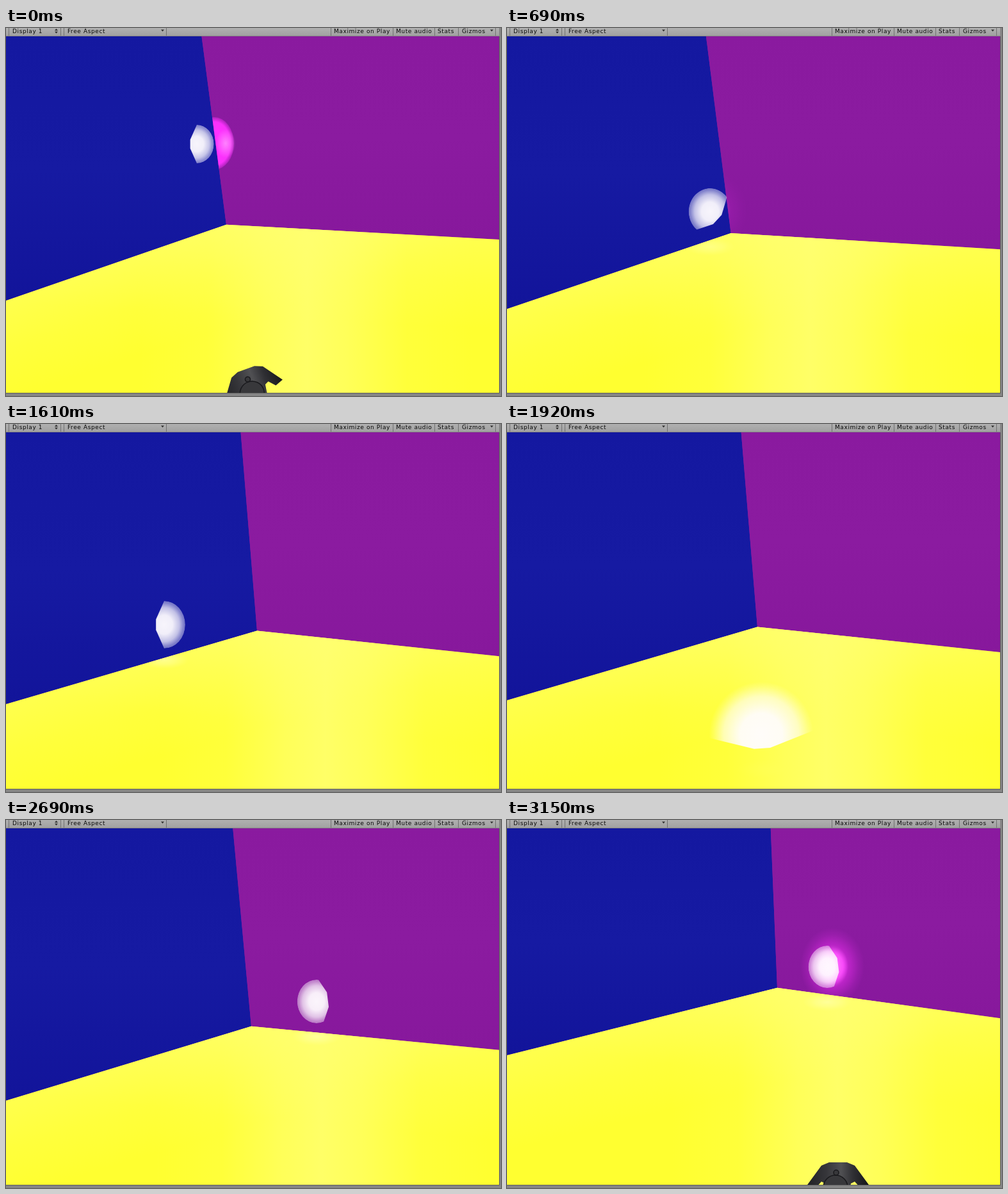
Animation of 773x574 px, one loop 3.23 s. Source, as an HTML page with a canvas:

```html
<!DOCTYPE html>
<html lang="en">
<head>
<meta charset="utf-8">
<style>
html, body { margin: 0; width: 100%; height: 100%; overflow: hidden; background: #868686; }
canvas { display: block; }
</style>
</head>
<body>
<canvas id="stage" width="773" height="574"></canvas>
<script>
const ctx = document.getElementById('stage').getContext('2d');
const LOOP = 3230, FPS = 13, STEPS = 42;
const TOP = 13, RIGHT = 770, BOTTOM = 569, RAD = Math.PI / 180;

// Key rows: step, then the values to blend
const corner = [[0, 344, 306.8], [5, 351, 312.8], [14, 348, 328.8], [21, 392, 322.6],
  [25, 391, 316.6], [35, 383, 321.8], [41, 422, 261.8]];
// x, y, radius, direction of the cut in degrees
const ball = [[0, 298, 181, 30, 180], [5, 250, 376, 39, 88], [14, 401, 174, 33, -8], [21, 247, 313, 37, 180],
  [25, 397, 484, 82, 86], [35, 485, 283, 34, -8], [41, 500, 229, 33, -8]];
// strength, hardness
const glow = [[0, 1, 1], [5, 0, 0], [14, 1, 0], [21, 0, 0], [35, 0, 0], [41, 1, 0]];
// x, y, tilt
const pad = [[0, 374.5, 531, -20], [5, 400, 580, -15], [14, 449, 564, -8], [35, 505, 580, 0], [41, 517, 533, 0]];

const lerp = (a, b, u) => a + (b - a) * u;

function blend(rows, step) {
  const n = Math.max(1, rows.findIndex(row => row[0] >= step));
  const a = rows[n - 1], b = rows[n], u = (step - a[0]) / (b[0] - a[0]);
  return a.slice(1).map((v, i) => lerp(v, b[i + 1], u));
}

function poly(points) {
  const p = new Path2D();
  points.forEach(([x, y]) => p.lineTo(x, y));
  p.closePath();
  return p;
}

function grade(g, stops) {
  stops.forEach(([pos, col]) => g.addColorStop(pos, col));
  return g;
}
const linear = (x0, y0, x1, y1, stops) => grade(ctx.createLinearGradient(x0, y0, x1, y1), stops);

function fill(path, style) {
  ctx.fillStyle = style;
  ctx.fill(path);
}

// Elliptical gradient clipped to a path
function halo(path, x, y, rx, ry, stops) {
  ctx.save();
  ctx.clip(path);
  ctx.translate(x, y);
  ctx.scale(rx, ry);
  ctx.beginPath();
  ctx.arc(0, 0, 1, 0, 2 * Math.PI);
  ctx.fillStyle = grade(ctx.createRadialGradient(0, 0, 0, 0, 0, 1), stops);
  ctx.fill();
  ctx.restore();
}

// Edge slopes follow from how far the camera has turned
function drawRoom([cx, cy]) {
  const d = cx - 344;
  const seam = cx - (cy - TOP) * (.131 - .0008 * d - .0000045 * d * d);
  const slopeL = .344 - .0009 * d - .000004 * d * d;
  const slopeR = .0545 + .00105 * d;
  const ly = cy + cx * slopeL, ry = cy + (RIGHT - cx) * slopeR;
  const blue = poly([[0, TOP], [seam, TOP], [cx, cy], [0, ly]]);
  const purple = poly([[seam, TOP], [RIGHT, TOP], [RIGHT, ry], [cx, cy]]);
  const floor = poly([[0, ly], [cx, cy], [RIGHT, ry], [RIGHT, BOTTOM], [0, BOTTOM]]);
  ctx.fillStyle = '#8a1a9e';
  ctx.fillRect(0, TOP, RIGHT, BOTTOM - TOP);
  fill(blue, linear(0, TOP, 0, ly, [[0, '#1418a0'], [.5, '#161aa2'], [1, '#12149a']]));
  fill(purple, linear(0, TOP, 0, ry, [[0, '#8a1a9f'], [.5, '#8b1ba0'], [1, '#87189c']]));
  fill(floor, '#ffff30');

  const pale = a => `rgba(255,255,118,${a})`;
  const mid = 470 + d * .6;
  fill(floor, linear(mid - 260, 0, mid + 260, 0,
    [[0, pale(0)], [.2, pale(.14)], [.38, pale(.58)], [.5, pale(.78)], [.62, pale(.58)], [.8, pale(.14)], [1, pale(0)]]));
  for (const slope of [-slopeL, slopeR])
    fill(floor, linear(cx, cy, cx - slope * 140, cy + 140, [[0, pale(.42)], [.5, pale(.17)], [1, pale(0)]]));
  return { purple, floor };
}

function drawGlow(wall, [power, hard], [bx, by]) {
  const a = power * power;
  if (a < .01) return;
  const x = bx + 8 + 19 * hard, y = by - 1, rx = 50 - 19 * hard, ry = 60 - 19 * hard;
  const pink = v => `rgba(255,50,255,${v * a})`;
  halo(wall, x, y, rx, ry, [[0, pink(1)], [.34, pink(lerp(.92, 1, hard))], [.5, pink(lerp(.45, 1, hard))],
    [.82, pink(lerp(.12, .95, hard))], [1, pink(.3 * hard)]]);
  halo(wall, x + 18 * hard, y, rx * .5, ry * .55, [
    [0, `rgba(255,150,255,${a * .8})`], [1, 'rgba(255,150,255,0)']]);
}

function drawBall([x, y, r, turn]) {
  const c = Math.cos(turn * RAD), flat = Math.abs(c);
  const rx = r * (1 - .11 * flat), rim = Math.max(0, 1 - r / 82) * .85;
  const bulge = .28 + .285 * flat + .115 * c;
  const open = 90 - Math.max(0, bulge - .45) * 60;
  const shape = new Path2D();
  shape.ellipse(x, y, rx, r, 0, (turn + open) * RAD, (turn + 360 - open) * RAD);
  for (const side of [-30, 30]) {
    const a = (turn + side) * RAD;
    shape.lineTo(x + rx * bulge * Math.cos(a), y + r * bulge * Math.sin(a));
  }
  shape.closePath();
  const white = v => `rgba(255,252,255,${v})`;
  halo(shape, x, y, rx, r, [[0, white(.97)], [.4, white(.94)],
    [.72, white(lerp(.62, .88, rim))], [.92, white(lerp(.15, .82, rim))], [1, white(rim * .85)]]);
}

function drawPad([x, y, tilt]) {
  const half = [[14, 1], [26, 6], [48, 36], [35, 41], [26, 31], [20, 34], [18, 47]];
  const mirrored = half.map(([px, py]) => [-px, py]).reverse();
  ctx.save();
  ctx.translate(x, y);
  ctx.rotate(tilt * RAD);
  fill(poly([...half, ...mirrored]), linear(-46, 0, 46, 0,
    [[0, '#232326'], [.3, '#36363a'], [.55, '#505053'], [.75, '#303034'], [1, '#18181b']]));
  ctx.lineWidth = 1.5;
  ctx.strokeStyle = '#19191c';
  ctx.fillStyle = '#38383b';
  for (const [px, py, r] of [[-4, 40, 19], [-3, 17, 4]]) {
    ctx.beginPath();
    ctx.arc(px, py, r, 0, 2 * Math.PI);
    ctx.fill();
    ctx.stroke();
  }
  ctx.restore();
}

function arrow(x, y, h) {
  fill(poly([[x - 2.5, y], [x + 2.5, y], [x, y + h]]), '#303030');
}

function drawFrame() {
  ctx.fillStyle = '#868686';
  ctx.fillRect(0, BOTTOM, 773, 5);
  ctx.fillRect(RIGHT, 0, 3, 574);
  ctx.fillStyle = '#5e5e5e';
  ctx.fillRect(0, BOTTOM, 771, 1);
  ctx.fillRect(RIGHT, TOP, 1, BOTTOM - TOP);
  ctx.fillStyle = linear(0, 0, 0, TOP, [[0, '#b0b0b0'], [1, '#a0a0a0']]);
  ctx.fillRect(0, 0, RIGHT, TOP);
  ctx.fillStyle = '#858585';
  ctx.fillRect(0, 12, RIGHT, 1);
  ctx.fillStyle = '#727272';
  for (const x of [4, 85, 90, 250, 507, 604, 669, 706, 764]) ctx.fillRect(x, 0, 1, 12);
  ctx.fillStyle = '#080808';
  ctx.font = '9px "DejaVu Sans", sans-serif';
  ctx.letterSpacing = '0.6px';
  const labels = [['Display 1', 10], ['Free Aspect', 96], ['Maximize on Play', 512],
    ['Mute audio', 609], ['Stats', 674], ['Gizmos', 712]];
  for (const [text, x] of labels) ctx.fillText(text, x, 8);
  arrow(78.5, 4, -3);
  arrow(78.5, 5.5, 3);
  arrow(244.5, 2.5, 3);
  arrow(758.5, 2.5, 3);
}

function draw(t) {
  const step = Math.min(STEPS - 1, Math.floor((t + 10) * FPS / 1000));
  const orb = blend(ball, step);
  ctx.clearRect(0, 0, 773, 574);
  ctx.save();
  ctx.beginPath();
  ctx.rect(0, TOP, RIGHT, BOTTOM - TOP);
  ctx.clip();
  const { purple, floor } = drawRoom(blend(corner, step));
  drawGlow(purple, blend(glow, step), orb);
  // Light spilling onto the floor while the ball is at a wall
  const spill = .55 * Math.abs(Math.cos(orb[3] * RAD));
  halo(floor, orb[0], orb[1] + 55, 38, 14, [
    [0, `rgba(255,255,190,${spill})`], [.5, `rgba(255,255,170,${spill * .7})`], [1, 'rgba(255,255,150,0)']]);
  drawBall(orb);
  drawPad(blend(pad, step));
  ctx.restore();
  drawFrame();
}

const start = performance.now();
function tick() {
  draw((performance.now() - start) % LOOP);
  requestAnimationFrame(tick);
}
tick();
</script>
</body>
</html>
```
